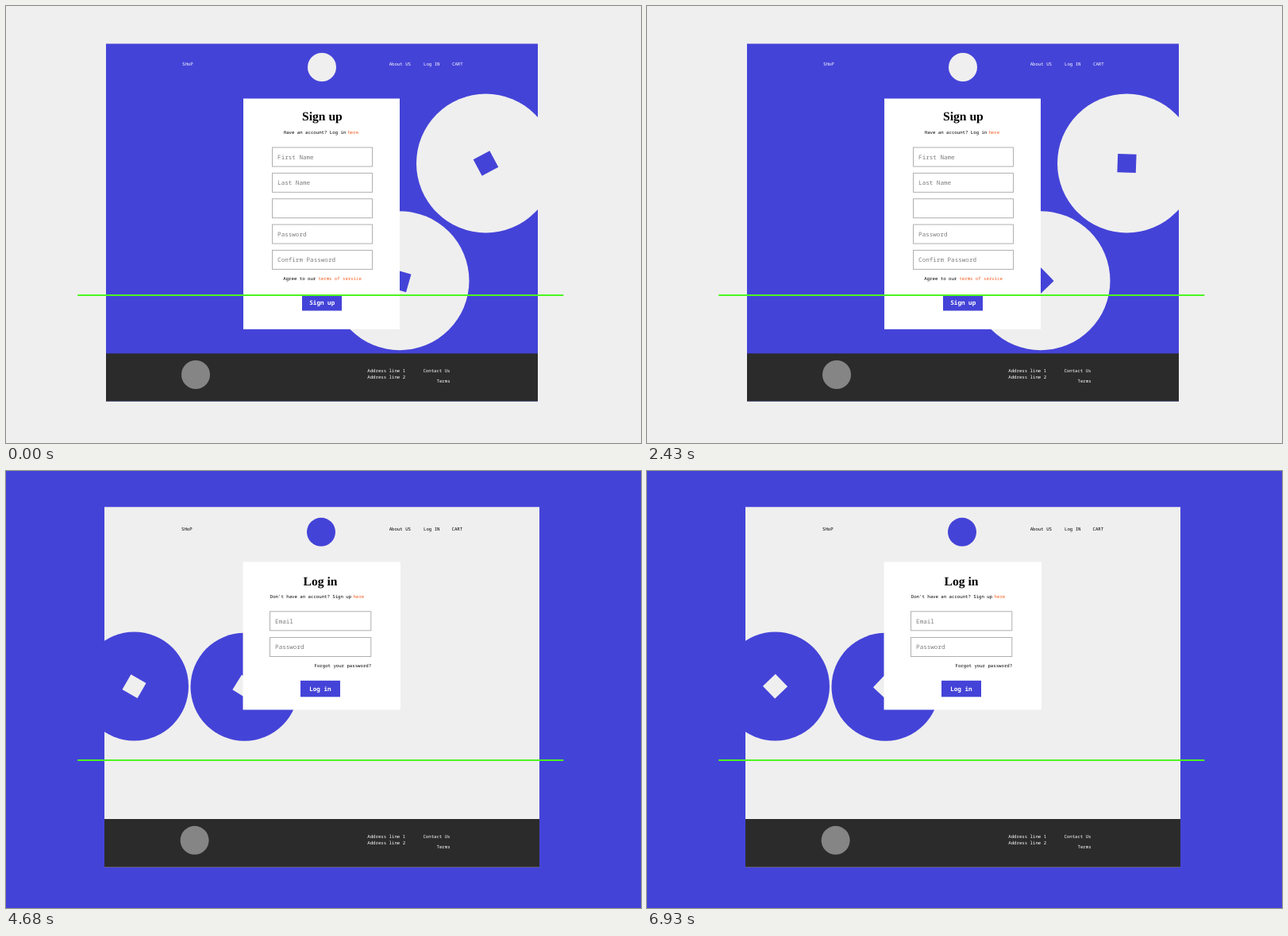
Recreate the animation shown at these times as an HTML page. Size 800 by 550 pixels, loop 6.96 s.

```html
<!DOCTYPE html>
<html lang="en">
<head>
<meta charset="utf-8">
<title>Sign up and log in</title>
<style>
  html, body { margin: 0; width: 100%; height: 100%; overflow: hidden; }
  svg { display: block; width: 800px; height: 550px; }
  text { font: 5.7px "Noto Sans Mono", monospace; text-rendering: geometricPrecision; white-space: pre; }
  .medium { font-weight: 500; }
  .title { font: bold 15.6px "Liberation Serif", serif; text-anchor: middle; }
  .hint { font-size: 7.6px; fill: #7d7d7d; }
  .button { font-size: 7.6px; font-weight: 600; fill: #fff; }
  .field { fill: #fff; stroke: #b0b0b0; }
</style>
</head>
<body>
<svg id="stage" viewBox="0 0 800 550"></svg>
<script>
const BLUE = '#4443d8', PALE = '#efefef', DARK = '#2b2b2b', ORANGE = '#f45d22';
const LOOP = 6960, SWITCH = 3660, STEP = 30;

const rect = (x, y, w, h, fill) =>
  `<rect x="${x}" y="${y}" width="${w}" height="${h}" fill="${fill}"/>`;
const disc = (x, y, r, fill) => `<circle cx="${x}" cy="${y}" r="${r}" fill="${fill}"/>`;
const text = (x, y, str, fill = '#000', cls = '') =>
  `<text x="${x}" y="${y}" fill="${fill}" class="${cls}">${str}</text>`;
const field = (x, y, w, hint) =>
  `<rect class="field" x="${x}" y="${y}" width="${w}" height="24"/>` +
  text(x + 6.6, y + 14.9, hint, '', 'hint');
const button = (x, y, label, dx) =>
  rect(x, y, 50, 20.5, BLUE) + text(x + dx, y + 12.7, label, '', 'button');
const spinner = (id, x, y, r, size, fill, ink) =>
  disc(x, y, r, fill) +
  `<g transform="translate(${x} ${y})"><g id="${id}">` +
  rect(-size / 2, -size / 2, size, size, ink) + '</g></g>';

const nav = (dx, y, fill) =>
  text(222 + dx, y, 'SHoP', fill) + text(482.7, y, 'About US', fill) +
  text(526, y, 'Log IN', fill) + text(562 + dx / 2, y, 'CART', fill);

const footer = (x, y, w, h, dx, dy) =>
  rect(x, y, w, h, DARK) + disc(239 + dx, 464 + dy, 18, '#858585') +
  text(455.3, 460.7 + dy, 'Address line 1', '#fff') +
  text(455.3, 468.8 + dy, 'Address line 2', '#fff') +
  text(525.4, 460.7 + dy, 'Contact Us', '#fff') +
  text(542.5, 473.8 + dy, 'Terms', '#fff');

const signUp =
  rect(0, 0, 800, 550, PALE) + rect(126, 47.5, 544, 450, BLUE) +
  '<g clip-path="url(#pageA)">' +
  spinner('a1', 604.5, 198, 87.5, 23.4, PALE, BLUE) +
  spinner('a2', 496, 345.7, 87.5, 23.4, PALE, BLUE) + '</g>' +
  disc(398, 77, 18, PALE) + nav(0, 75, '#fff') +
  rect(299, 116.5, 197, 290.3, '#fff') +
  text(398.4, 144, 'Sign up', '#000', 'title') +
  text(349.8, 161, 'Have an account? Log in', '#000', 'medium') +
  text(430.4, 161, 'here', ORANGE, 'medium') +
  ['First Name', 'Last Name', '', 'Password', 'Confirm Password']
    .map((hint, i) => field(335.5, 178 + 32.35 * i, 126, hint)).join('') +
  text(349.3, 345.2, 'Agree to our', '#000', 'medium') +
  text(393.4, 345.2, 'terms of service', ORANGE, 'medium') +
  button(373, 363, 'Sign up', 9.3) +
  footer(126, 437.3, 544, 60.2, 0, 0);

const logIn =
  rect(0, 0, 800, 550, BLUE) + rect(124, 45.3, 548, 453.3, PALE) +
  '<g clip-path="url(#pageB)">' +
  spinner('b1', 161.5, 271, 68.5, 22, BLUE, PALE) +
  spinner('b2', 300.5, 271.7, 68, 22, BLUE, PALE) + '</g>' +
  disc(397, 76.8, 18, BLUE) + nav(-1, 74.6, '#000') +
  rect(298.5, 114.5, 198.5, 186, '#fff') +
  text(396, 144, 'Log in', '#000', 'title') +
  text(332.8, 159.8, "Don't have an account? Sign up", '#000', 'medium') +
  text(437.6, 159.8, 'here', ORANGE, 'medium') +
  field(332.5, 176.8, 127.3, 'Email') + field(332.5, 209.5, 127.3, 'Password') +
  text(388.5, 247, 'Forgot your password?') +
  button(371, 263.8, 'Log in', 11.2) +
  footer(124, 438, 548, 60.6, -1.4, 0.8);

const stage = document.getElementById('stage');
stage.innerHTML =
  '<clipPath id="pageA"><rect x="126" y="47.5" width="544" height="450"/></clipPath>' +
  '<clipPath id="pageB"><rect x="124" y="45.3" width="548" height="453.3"/></clipPath>' +
  `<g id="signUp">${signUp}</g><g id="logIn">${logIn}</g>` +
  '<path d="M91 364H701.5" stroke="#4cf51f" stroke-width="2.2" stroke-linecap="round"/>';

const byId = id => document.getElementById(id);
const turn = (id, angle) => byId(id).setAttribute('transform', `rotate(${angle})`);
const show = (id, on) => byId(id).setAttribute('display', on ? 'inline' : 'none');

function draw(now) {
  const t = Math.floor((now % LOOP) / STEP) * STEP;
  const first = t < SWITCH;
  show('signUp', first);
  show('logIn', !first);
  if (first) {
    // Each turn takes 60 steps and rests for one more.
    const angle = (t % 1830) * 0.2;
    turn('a1', angle - 28);
    turn('a2', angle + 16);
  } else {
    const p = ((t - SWITCH) % 1100) / 1100;
    turn('b1', 360 * p - 34);
    turn('b2', 360 * (p + 0.1 * Math.sin(Math.PI * p)) - 40);
  }
}

const start = performance.now();
function tick() {
  draw(performance.now() - start);
  requestAnimationFrame(tick);
}
tick();
</script>
</body>
</html>
```
